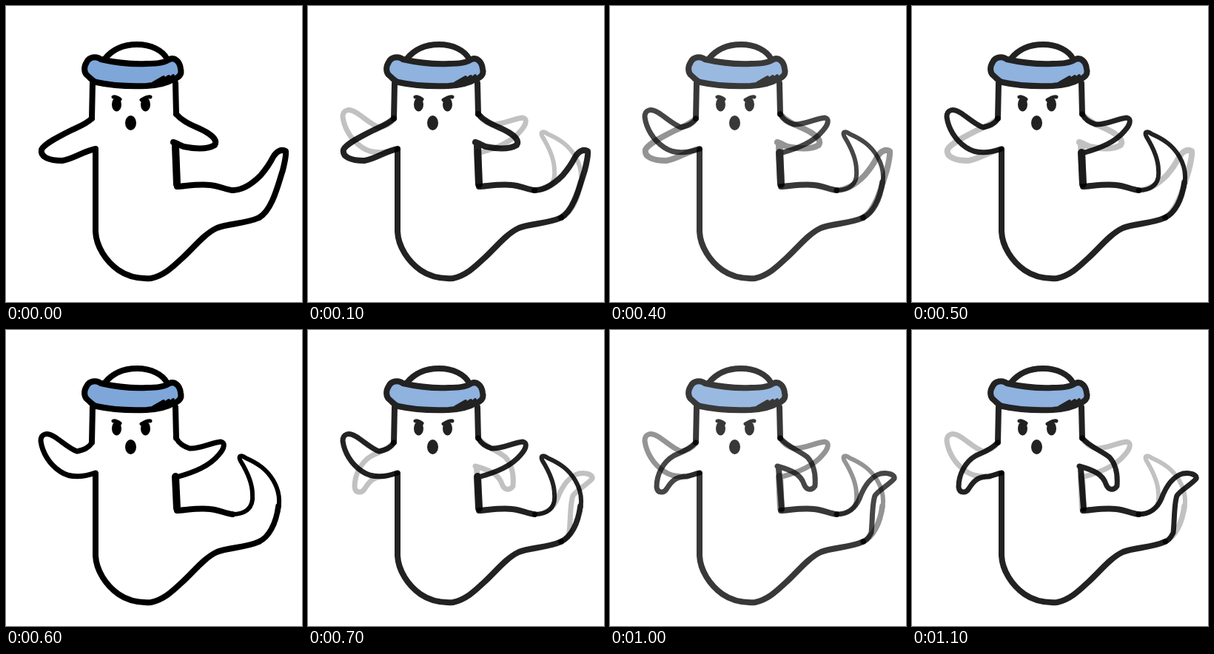
Animation of 400 by 400 pixels, one loop 1200 ms. Source, as an HTML page:

```html
<!DOCTYPE html>
<html lang="en">
<head>
<meta charset="utf-8">
<title>Waving ghost</title>
<style>
  html, body { margin: 0; width: 100%; height: 100%; overflow: hidden; background: #fff; }
  svg { display: block; width: 100%; height: 100%; }
  .line { fill: none; stroke: #000; stroke-width: 8; stroke-linecap: round; stroke-linejoin: round; }
  .brim { fill: #7ea6d9; }
</style>
</head>
<body>
<svg viewBox="0 0 400 400">
  <g id="core">
    <path class="line" d="M133 72C144 58 160 52 177 52C196 52 212 60 218 72"/>
    <path class="line brim" d="M128 72C122 67 112 69 109 76C105 82 105 90 110 94C116 99 116 101 122 103C140 107 165 109 190 108C205 107 218 104 226 99C234 97 238 92 236 85C235 75 228 69 221 72C216 76 205 78 190 78C168 79 150 77 128 72Z"/>
    <path class="line" style="stroke-width:4" d="M199 104L213 96M207 104L220 95M216 102L226 94"/>
    <path class="line" d="M117 104L116 152M229 104L230 146"/>
    <path class="line" style="stroke-width:5" d="M145 123C148 122 151 124 154 126M195 123C191 122 187 125 183 127"/>
    <ellipse cx="149.500" cy="133" rx="6.500" ry="9.500"/>
    <ellipse cx="188.500" cy="133" rx="6.500" ry="9.500"/>
    <ellipse cx="168.500" cy="158" rx="7.500" ry="10"/>
    <path class="line" d="M121 194L121 305C122 325 135 345 152 357C165 366 180 369 196 368C215 364 228 350 240 339C255 325 268 308 285 300C300 294 325 294 342 286"/>
    <path class="line" d="M231 244C245 243 262 240 276 242C288 243 296 248 306 249"/>
  </g>
</svg>
<script>
const NS = 'http://www.w3.org/2000/svg';
const LOOP = 1200, STEP = 100, FADE = 600;

// Each pose lists its strokes as [path, width].
const out = [
  ['M116 152C108 160 96 164 88 168C72 176 52 186 48 194C46 204 58 209 76 209C90 207 105 196 121 193', 8],
  ['M230 146C240 158 255 162 270 170C280 176 286 182 282 188C272 194 255 193 240 190C235 188 230 185 226 184', 8],
  ['M229 189L231 241', 10],
  ['M306 249C322 249 335 238 344 229C350 222 355 216 361 204C366 196 372 193 378 196C379 202 377 210 374 222C368 240 360 276 342 286', 8]
];
const up = [
  ['M116 152C112 160 104 162 96 164C85 160 75 150 65 144C55 138 47 140 47 150C49 165 58 181 73 191C86 200 104 199 121 193', 7],
  ['M230 146C234 154 240 157 248 160C262 161 278 152 290 151C297 152 295 160 288 168C275 184 255 192 230 199', 7],
  ['M229 198L231 241', 10],
  ['M306 249C322 249 335 242 333 222C333 205 325 190 317 177C313 170 318 168 324 173C340 180 352 188 361 203C370 218 371 232 367 247', 6],
  ['M368 238C365 262 355 280 342 286', 7.5]
];
const down = [
  ['M116 152C104 164 94 166 86 170C72 178 63 195 63 212C64 221 73 221 77 214C85 201 92 198 104 198C112 196 118 193 121 193', 7],
  ['M230 146C240 158 256 163 267 172C277 183 278 198 277 211C272 218 265 216 262 208C258 196 248 190 226 184', 7],
  ['M228 187L232 242', 8],
  ['M306 249C322 249 332 240 337 228C343 212 352 198 366 194C376 192 386 196 384 201C376 210 362 217 358 224C354 235 355 255 353 274C350 280 346 285 342 286', 7]
];

function add(parent, tag, attrs) {
  const node = document.createElementNS(NS, tag);
  for (const key in attrs) node.setAttribute(key, attrs[key]);
  return parent.appendChild(node);
}

function makeLimbs(strokes) {
  const limbs = add(document.querySelector('svg'), 'g', { opacity: 0 });
  for (const [d, width] of strokes) add(limbs, 'path', { class: 'line', d, style: `stroke-width:${width}` });
  return limbs;
}

const core = document.getElementById('core');
const [outLimbs, upLimbs, downLimbs] = [out, up, down].map(makeLimbs);
const fade = amount => Math.pow(Math.max(0, amount), 0.8);

function render(ms) {
  const time = Math.floor((ms % LOOP) / STEP) * STEP;
  const fromUp = (time - FADE) / FADE;
  const mix = (time % FADE) / FADE;
  // The body dims as two half-transparent copies would when they overlap.
  core.setAttribute('opacity', 1 - mix * (1 - mix));
  outLimbs.setAttribute('opacity', fade(-fromUp));
  upLimbs.setAttribute('opacity', fade(1 - Math.abs(fromUp)));
  downLimbs.setAttribute('opacity', fade(fromUp));
}

const start = performance.now();
function tick(now) {
  render(Math.max(0, now - start));
  requestAnimationFrame(tick);
}
render(0);
requestAnimationFrame(tick);
</script>
</body>
</html>
```
